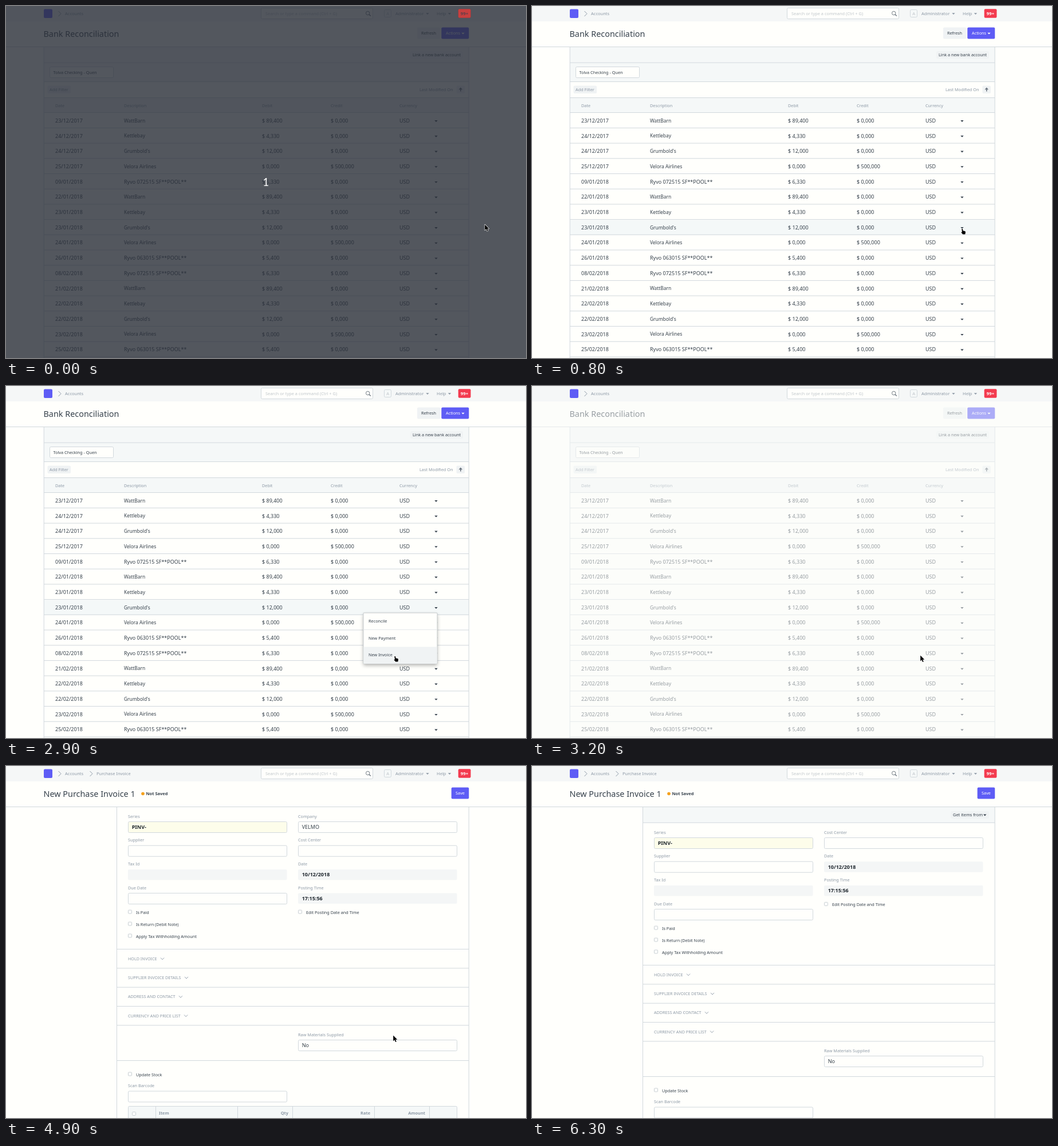
Animation, 908 px wide and 616 px high, one loop 7.6 s. Source, as an HTML page with a canvas:

```html
<!DOCTYPE html>
<html lang="en">
<head>
<meta charset="utf-8">
<title>Bank Reconciliation</title>
<style>
html, body { margin: 0; width: 100%; height: 100%; overflow: hidden; background: #fffffc; }
canvas { display: block; }
</style>
</head>
<body>
<canvas id="stage" width="908" height="616"></canvas>
<script>
const ctx = document.getElementById('stage').getContext('2d');
const LOOP = 7600;
const PAGE = '#fffffc', PANEL = '#f5f8f8', BUTTON = '#f0f3f4', LINE = '#d1d8dd';
const DARK = '#36414c', MUTED = '#8d99a6', BLUE = '#5e5cf5', RED = '#f33b4f';
const SMALL = 7.3, BODY = 9;

// ---- drawing helpers ----
function text(s, x, y, size = SMALL, color = DARK, weight = 400, align = 'left', family = '"Noto Sans"') {
  ctx.font = `${weight} ${size}px ${family}, sans-serif`;
  ctx.textAlign = align;
  ctx.fillStyle = color;
  ctx.fillText(s, x, y + size * 0.36);
  return ctx.measureText(s).width;
}

function box(x1, y1, x2, y2, fill, border, radius = 2) {
  ctx.beginPath();
  ctx.roundRect(x1, y1, x2 - x1, y2 - y1, radius);
  if (fill) { ctx.fillStyle = fill; ctx.fill(); }
  if (border) { ctx.strokeStyle = border; ctx.lineWidth = 1; ctx.stroke(); }
}

function path(points, color, width) {
  ctx.beginPath();
  points.forEach(([x, y]) => ctx.lineTo(x, y));
  ctx.strokeStyle = color;
  ctx.lineWidth = width;
  ctx.stroke();
}

function rect(x1, y1, x2, y2, color) {
  ctx.fillStyle = color;
  ctx.fillRect(x1, y1, x2 - x1, y2 - y1);
}

const hline = (x1, x2, y) => rect(x1, y, x2, y + 1, LINE);
const vline = (x, y1, y2) => rect(x, y1, x + 1, y2, LINE);

function caret(x, y, color = DARK, half = 2.7) {
  ctx.beginPath();
  ctx.moveTo(x - half, y - 1.3);
  ctx.lineTo(x + half, y - 1.3);
  ctx.lineTo(x, y + 1.6);
  ctx.fillStyle = color;
  ctx.fill();
}

const chevronRight = x => path([[x, 9], [x + 4.5, 13.5], [x, 18]], MUTED, 1);
const chevronDown = (x, y) => path([[x - 3, y - 1.5], [x, y + 1.7], [x + 3, y - 1.5]], MUTED, 0.9);

// ---- shared header ----
function navbar(onForm) {
  rect(0, 0, 908, 27, '#f5f7f7');
  box(66, 5.5, 81, 21, BLUE);
  chevronRight(91.5);
  text('Accounts', 103, 13.5, 7.5, MUTED, 500);
  if (onForm) {
    chevronRight(146.5);
    text('Purchase Invoice', 158, 13.5, 7.5, MUTED, 500);
  }
  box(445.5, 3.5, 640.5, 22.5, PAGE, LINE);
  text('Search or type a command (Ctrl + G)', 453, 13, 7.4, '#c0c6cb');
  ctx.beginPath();
  ctx.arc(631.7, 12.5, 3.2, 0, 7);
  ctx.strokeStyle = '#6c7680';
  ctx.lineWidth = 1;
  ctx.stroke();
  path([[634, 14.8], [636.8, 17.6]], '#6c7680', 1.4);
  box(660.5, 6.5, 672.5, 19.5, PANEL, LINE);
  text('A', 666.7, 13.2, 7.6, '#c0c6cb', 400, 'center');
  text('Administrator', 680, 13, 7.6, MUTED, 500);
  caret(736, 13.5, MUTED);
  text('Help', 752, 13, 7.6, MUTED, 500);
  caret(774.5, 13.5, MUTED);
  badge(RED, '#fff');
}

function badge(fill, color) {
  box(789.7, 5.2, 811.5, 20.8, fill);
  text('99+', 800.5, 13, 7.8, color, 600, 'center');
}

function pageHead(title) {
  text(title, 65.5, 48.5, 14.4);
  hline(0, 908, 71);
}

function toolbar(x) {
  rect(x, 72, 808, 99, PANEL);
  hline(x, 808, 98.7);
}

// ---- bank list ----
const dates = ['23/12', '24/12', '24/12', '25/12', '09/01', '22/01', '23/01', '23/01',
  '24/01', '26/01', '08/02', '21/02', '22/02', '22/02', '23/02', '25/02'];
const entries = [
  ['WattBarn', '89,400', '0,000'],
  ['Kettlebay', '4,330', '0,000'],
  ["Grumbold's", '12,000', '0,000'],
  ['Velora Airlines', '0,000', '500,000'],
  ['Ryvo 063015 SF**POOL**', '5,400', '0,000'],
  ['Ryvo 072515 SF**POOL**', '6,330', '0,000']
];
const columns = [86, 206, 447, 567, 687];

function bankList(rowHover) {
  pageHead('Bank Reconciliation');
  box(718, 37.6, 758.3, 57.4, BUTTON);
  text('Refresh', 738, 47.5, SMALL, DARK, 400, 'center');
  box(760.3, 37.6, 808.3, 57.4, BLUE);
  text('Actions', 768, 47.5, SMALL, '#fff');
  caret(798, 48, '#fff');

  toolbar(66);
  box(706, 79, 798, 92, BUTTON);
  text('Link a new bank account', 710, 85.3);
  rect(66, 100, 808, 132, PANEL);
  hline(66, 808, 132);
  box(76.5, 106.5, 187.5, 125.5, PAGE, LINE);
  text('Tolva Checking - Quen', 82.5, 116);
  box(72.5, 139.5, 113, 153, BUTTON);
  text('Add Filter', 76, 146.3, SMALL, MUTED);
  text('Last Modified On', 722, 146, SMALL, MUTED);
  box(786.5, 139.5, 801, 153, BUTTON);
  rect(793, 145, 794.6, 149.5, '#6c7680');
  ctx.beginPath();
  ctx.moveTo(790.5, 146.3);
  ctx.lineTo(793.8, 142.5);
  ctx.lineTo(797.1, 146.3);
  ctx.fill();

  rect(66, 161, 808, 186, PANEL);
  hline(66, 808, 160);
  hline(66, 808, 186);
  ['Date', 'Description', 'Debit', 'Credit', 'Currency']
    .forEach((s, i) => text(s, columns[i], 174, SMALL, MUTED));

  dates.forEach((day, i) => {
    const y = 200.6 + i * 26.7;
    const [name, debit, credit] = entries[(i < 4 ? i : i + 1) % 6];
    if (rowHover && i === 7) rect(66, y - 13, 808, y + 13, '#f4f8f8');
    const cells = [`${day}/${i < 4 ? 2017 : 2018}`, name, `$ ${debit}`, `$ ${credit}`, 'USD'];
    cells.forEach((s, c) => text(s, columns[c], y, c === 1 && !/\d/.test(s) ? 8.4 : BODY));
    caret(751, y + 0.8);
    hline(66, 808, y + 12.3);
  });
  vline(65.7, 72, 616);
  vline(807.7, 72, 616);
}

function menu(hovered) {
  ctx.save();
  ctx.shadowColor = 'rgba(0,0,0,.3)';
  ctx.shadowBlur = 6;
  ctx.shadowOffsetY = 3;
  box(624, 397, 753, 486, PAGE);
  ctx.restore();
  box(624, 397, 753, 486, null, '#c5cacc', 1);
  if (hovered >= 0) rect(624.5, 397.5 + hovered * 29.5, 752.5, 427 + hovered * 29.5, '#f0f3f4');
  rect(624, 426, 753, 427, '#e4e8ea');
  ['Reconcile', 'New Payment', 'New Invoice'].forEach((s, i) => text(s, 633, 411.6 + i * 29.5));
}

// ---- invoice form ----
function checkbox(s, x, y) {
  box(x + 0.5, y - 3.5, x + 6.5, y + 2.5, PAGE, '#c8cfd4', 1);
  if (s) text(s, x + 14, y + 0.5);
}

function field(label, x, y, { value = '', locked, fill = PAGE, bold = locked } = {}) {
  const right = x + 277.5;
  text(label, x, y, SMALL, MUTED);
  if (locked) box(x, y + 9.5, right, y + 28, '#f4f6f6');
  else box(x + 0.5, y + 9.5, right, y + 28.5, fill, LINE);
  text(value, x + 6.7, y + 18.7, BODY, bold ? '#1f272e' : DARK, bold ? 700 : 400);
}

function form(loaded) {
  const L = 213, R = 510, shift = loaded ? 28 : 0, step = 41.7;
  pageHead('New Purchase Invoice 1');
  ctx.beginPath();
  ctx.arc(239, 48.5, 2.8, 0, 7);
  ctx.fillStyle = '#f5a11c';
  ctx.fill();
  text('Not Saved', 244.5, 48.7, 7.5, DARK, 600);
  box(777.7, 37.6, 808.3, 57.4, BLUE);
  text('Save', 793, 47.5, SMALL, '#fff', 400, 'center');
  if (loaded) {
    toolbar(193);
    box(731, 79, 798, 92, BUTTON);
    text('Get items from', 735, 85.3, 7.4);
    caret(790.8, 85.8);
  }

  ctx.save();
  ctx.translate(0, shift);
  field('Series', L, 88, { value: 'PINV-', fill: '#fdfdea', bold: true });
  field('Supplier', L, 88 + step);
  field('Tax Id', L, 88 + step * 2, { locked: true });
  field('Due Date', L, 88 + step * 3);
  ['Is Paid', 'Is Return (Debit Note)', 'Apply Tax Withholding Amount']
    .forEach((s, i) => checkbox(s, L, 255.7 + i * 20.9));

  let y = 88;
  if (!loaded) {
    field('Company', R, y, { value: 'VELMO' });
    y += step;
  }
  field('Cost Center', R, y);
  field('Date', R, y + step, { value: '10/12/2018', locked: true });
  field('Posting Time', R, y + step * 2, { value: '17:15:56', locked: true });
  checkbox('Edit Posting Date and Time', R, y + 126);

  ['HOLD INVOICE', 'SUPPLIER INVOICE DETAILS', 'ADDRESS AND CONTACT', 'CURRENCY AND PRICE LIST']
    .forEach((s, i) => {
      const top = 320.1 + i * 33.3;
      hline(193, 808, top);
      chevronDown(L + text(s, L, top + 17, 7.2, MUTED) + 9.5, top + 17);
    });
  hline(193, 808, 453.3);
  field('Raw Materials Supplied', R, 470, { value: 'No' });
  hline(193, 808, 515);
  checkbox('Update Stock', L, 539.5);
  field('Scan Barcode', L, 559.5);

  box(213.5, 595.5, 787.5, 640, PANEL, LINE);
  [261, 404, 500, 643, 739].forEach(x => vline(x, 595, 616));
  checkbox('', 220, 609);
  text('Item', 267, 607, 7.4, MUTED, 600);
  [['Qty', 493], ['Rate', 636], ['Amount', 732]]
    .forEach(([s, x]) => text(s, x, 607, 7.4, MUTED, 600, 'right'));
  ctx.restore();
  vline(193, 72, 616);
  vline(807.7, 72, 616);
}

// ---- pointer: [start, steps of 100 ms, x, y] ----
const moves = [
  [400, 5, 751, 388], [2000, 4, 636, 450], [2500, 1, 684, 440], [2600, 1, 679, 471],
  [4800, 1, 677, 471], [5100, 2, 654, 430], [5400, 3, 480, 254], [5800, 3, 105, 24],
  [6200, 1, 29, -1], [6300, 1, -30, -30]
];

function pointerAt(t) {
  let x = 837, y = 382;
  for (const [start, steps, toX, toY] of moves) {
    if (t < start) break;
    const k = Math.min(1, (Math.floor((t - start) / 100) + 1) / steps);
    x += (toX - x) * k;
    y += (toY - y) * k;
  }
  return [x, y];
}

const arrow = new Path2D('M.5 .5V10.4L2.8 8.3L4.4 12L6.1 11.3L4.5 7.7H7.6Z');
const hand = new Path2D('M1.3 1.2Q2.2 .2 3.1 1.2L3.6 4.3L7 5Q8.2 5.4 8 7L7.4 10.4H3.2L.6 7.6Q0 6.6 1 6.4L2 6.8Z');

function pointer(x, y, isHand) {
  ctx.save();
  ctx.translate(x - (isHand ? 2 : 1.3), y + (isHand ? 1 : 0));
  ctx.lineJoin = 'round';
  ctx.lineWidth = 1.2;
  ctx.strokeStyle = '#fff';
  ctx.fillStyle = '#000';
  const shape = isHand ? hand : arrow;
  ctx.stroke(shape);
  ctx.fill(shape);
  ctx.restore();
}

// ---- timeline ----
function fadeAt(t) {
  if (t < 3100 || t >= 4600) return 0;
  return t < 3200 || t >= 4500 ? 0.25 : 0.5;
}

function draw(t) {
  const [x, y] = pointerAt(t);
  const onForm = t >= 4500;
  rect(0, 0, 908, 616, PAGE);
  navbar(onForm);
  if (onForm) {
    form(t >= 5100);
  } else {
    bankList(t >= 400 && t < 3100 && x < 808);
    if (t >= 1500 && t < 3100) menu(x < 753 && y > 397 ? Math.floor((y - 397) / 29.6) : -1);
  }
  rect(0, 27, 908, 616, `rgba(250,252,250,${fadeAt(t)})`);
  if (t < 100) {
    rect(0, 0, 908, 616, 'rgba(40,45,56,.8)');
    badge('#c8403f', '#5b3f49');
    text('1', 453.7, 308, 19, '#fff', 400, 'center', 'Lato');
  }
  pointer(x, y, (t >= 800 && t < 2000) || (t >= 2900 && t < 3100));
}

const begin = performance.now();
function tick() {
  draw((performance.now() - begin) % LOOP);
  requestAnimationFrame(tick);
}
tick();
</script>
</body>
</html>
```
